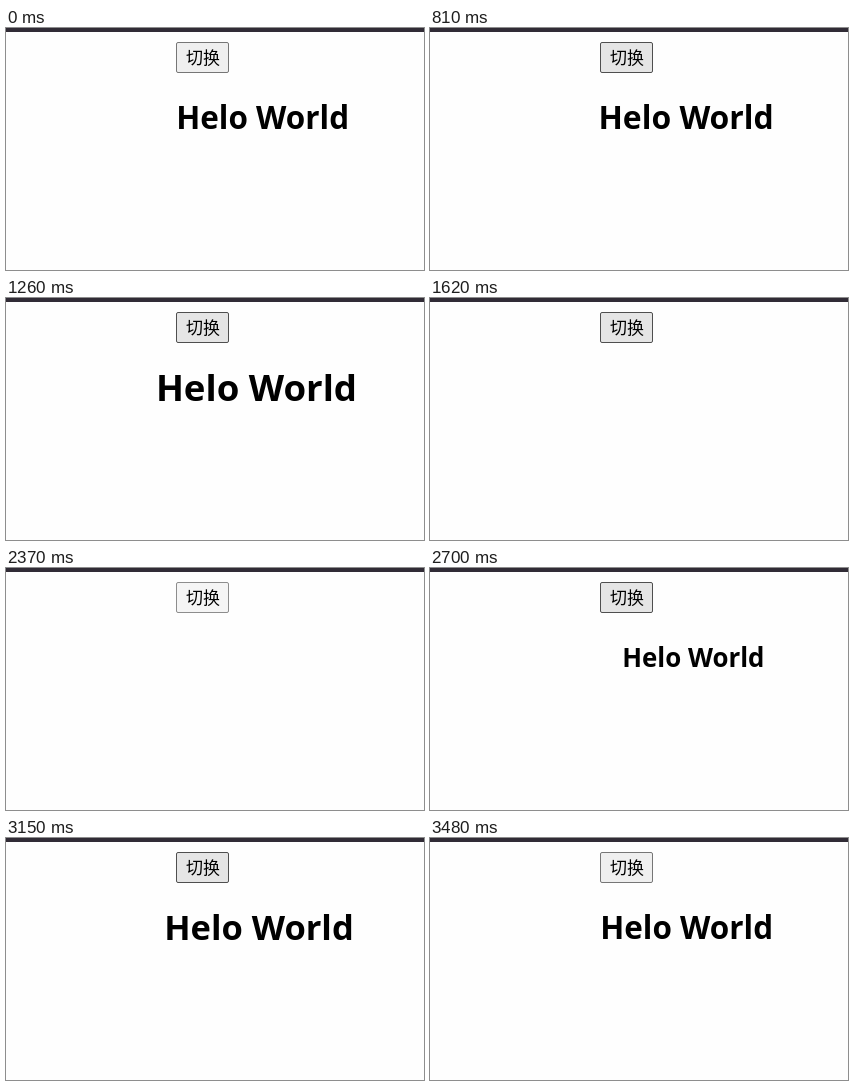
These frames come from a looping animation (418x242 px, 4530 ms). An HTML page:

```html
<!DOCTYPE html>
<html lang="zh">
<head>
<meta charset="utf-8">
<title>切换</title>
<style>
  html, body { margin: 0; width: 100%; height: 100%; overflow: hidden; background: #fff; }
  svg { display: block; }
  #title { font: bold 31.45px "Open Sans", "Noto Sans", sans-serif; }
  #label { font: 300 17px "Noto Sans CJK SC", "Noto Sans CJK", sans-serif; text-anchor: middle; }
</style>
</head>
<body>
<svg width="418" height="242" viewBox="0 0 418 242">
  <rect width="418" height="242" fill="#fefefe"/>
  <rect width="418" height="4" fill="#312c36"/>
  <rect id="button" x="170.5" y="14.5" width="52" height="30" rx="1.5"/>
  <text id="label" x="197" y="36.3">切换</text>
  <text id="title" x="170.2" y="101">Helo World</text>
</svg>
<script>
const LOOP = 4530;
const HALF = 500;
const PEAK = 1.2;
const LEAVE = { start: 650, end: 1620 };
const ENTER = { start: 2500, end: 3480 };
const ORIGIN = [294.5, 88.5];

const IDLE = ['#efefef', '#767676'];
const HOVER = ['#e5e5e5', '#4f4f4f'];
const ACTIVE = ['#f5f5f5', '#8d8d8d'];
const BUTTON_STATES = [
  [0, IDLE], [180, HOVER], [600, ACTIVE], [660, HOVER],
  [2370, ACTIVE], [2520, HOVER], [3330, IDLE]
];

const button = document.getElementById('button');
const title = document.getElementById('title');

// CSS "ease": cubic-bezier(.25, .1, .25, 1)
function ease(x) {
  if (x <= 0) return 0;
  if (x >= 1) return 1;
  let lo = 0, hi = 1;
  for (let i = 0; i < 24; i++) {
    const u = (lo + hi) / 2;
    if (0.75 * u * (1 - u) + u ** 3 < x) lo = u; else hi = u;
  }
  const u = (lo + hi) / 2, v = 1 - u;
  return 0.3 * v * v * u + 3 * v * u * u + u ** 3;
}

// Grows from nothing past full size, then settles
function bounce(t) {
  return t < HALF
    ? PEAK * ease(t / HALF)
    : PEAK + (1 - PEAK) * ease((t - HALF) / HALF);
}

function titleScale(t) {
  if (t < LEAVE.start || t >= ENTER.end) return 1;
  if (t < LEAVE.end) return bounce(2 * HALF - (t - LEAVE.start));
  return t < ENTER.start ? 0 : bounce(t - ENTER.start);
}

function render(t) {
  const [fill, stroke] = BUTTON_STATES.filter(([from]) => t >= from).pop()[1];
  button.setAttribute('fill', fill);
  button.setAttribute('stroke', stroke);

  const scale = titleScale(t);
  const [x, y] = ORIGIN;
  title.setAttribute('visibility', scale > 0 ? 'visible' : 'hidden');
  title.setAttribute('transform',
    `translate(${x} ${y}) scale(${scale}) translate(${-x} ${-y})`);
}

const began = performance.now();
function tick() {
  render((performance.now() - began) % LOOP);
  requestAnimationFrame(tick);
}
tick();
</script>
</body>
</html>
```
